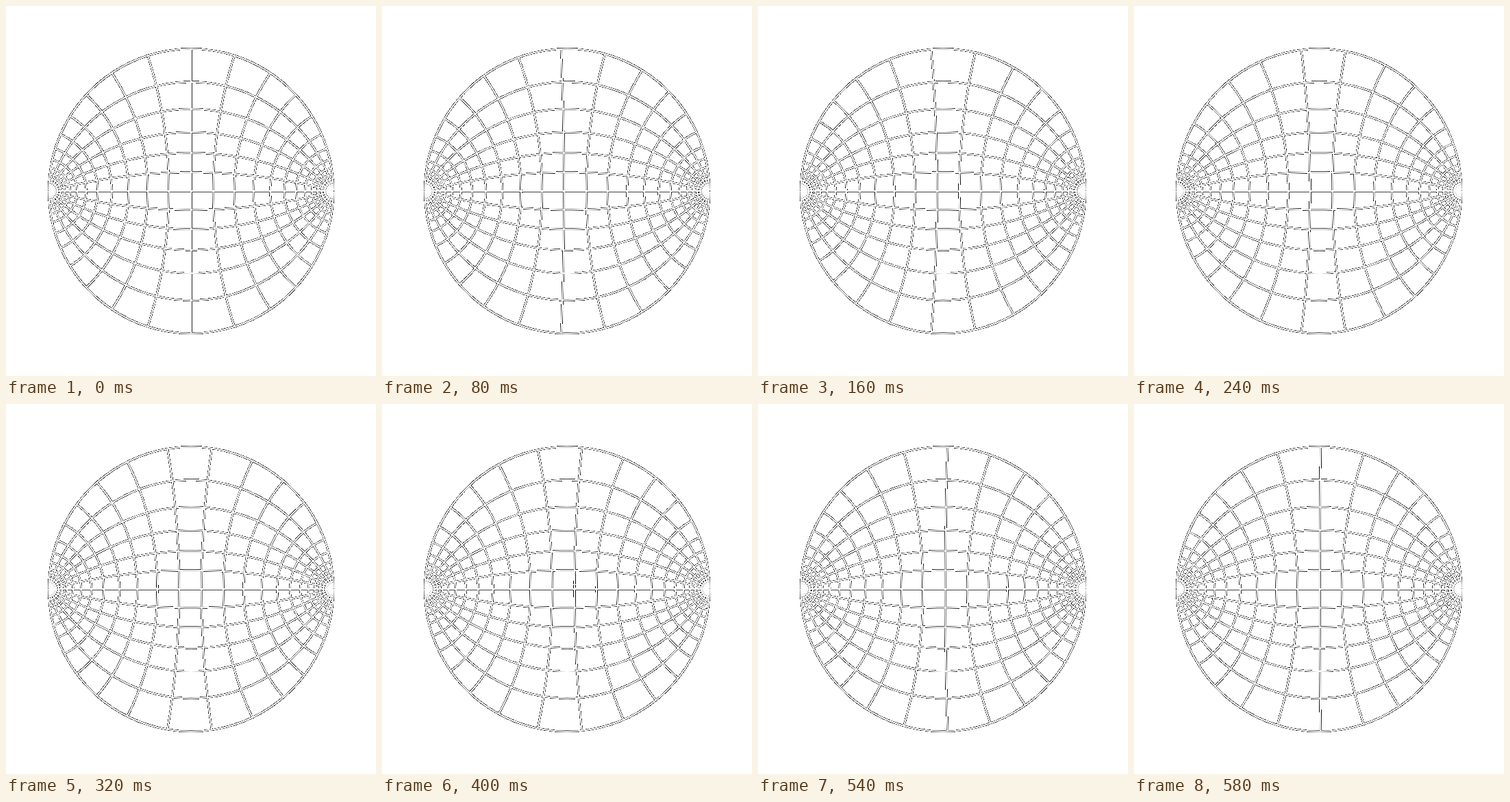
These frames come from a looping animation (540 px wide and 540 px high, 0.6 s). An HTML page with a canvas:

```html
<!DOCTYPE html>
<html>
<head>
<meta charset="utf-8">
<style>
  html, body { margin: 0; height: 100%; overflow: hidden; background: #fff; }
  canvas { display: block; }
</style>
</head>
<body>
<canvas id="stage" width="540" height="540"></canvas>
<script>
const SIZE = 540, CENTER = 270.12, RADIUS = SIZE / 2.6, WIDTH = 2.04;
const LOOP = 600, TICK = 20;
const STEP_U = Math.PI / 10;   // spacing of the circles around the poles
const STEP_V = Math.PI / 12;   // spacing of the arcs through the poles
const REACH = 20;              // circles on each side of the middle
const EDGE = Math.PI / 2;      // v on the rim of the disc

const stage = document.getElementById('stage').getContext('2d');
const layer = new OffscreenCanvas(SIZE, SIZE).getContext('2d', { willReadFrequently: true });
layer.lineWidth = WIDTH;
layer.strokeStyle = '#fff';

// z = tanh((u + iv) / 2) bends a straight strip into the disc
function project(u, v) {
  const scale = RADIUS / (Math.cosh(u) + Math.cos(v));
  return [CENTER + Math.sinh(u) * scale, CENTER + Math.sin(v) * scale];
}

function curve(from, to, pieces) {
  layer.beginPath();
  for (let i = 0; i <= pieces; i++) {
    const k = i / pieces;
    layer.lineTo(...project(from[0] + (to[0] - from[0]) * k, from[1] + (to[1] - from[1]) * k));
  }
  layer.stroke();
}

// Only partly covered pixels show: white over black, on a white page
function showEdges() {
  const image = layer.getImageData(0, 0, SIZE, SIZE), data = image.data;
  for (let i = 0; i < data.length; i += 4) {
    data[i] = data[i + 1] = data[i + 2] = data[i + 3] || 255;
    data[i + 3] = 255;
  }
  stage.putImageData(image, 0, 0);
}

function draw(now) {
  const shift = Math.floor(now % LOOP / TICK) * TICK / LOOP;
  const far = REACH * STEP_U;
  layer.clearRect(0, 0, SIZE, SIZE);
  for (let j = -6; j <= 6; j++) curve([-far, j * STEP_V], [far, j * STEP_V], 160);
  for (let i = -REACH; i <= REACH; i++) {
    const u = (i - shift) * STEP_U;
    curve([u, -EDGE], [u, EDGE], 48);
  }
  showEdges();
  requestAnimationFrame(draw);
}
requestAnimationFrame(draw);
</script>
</body>
</html>
```
